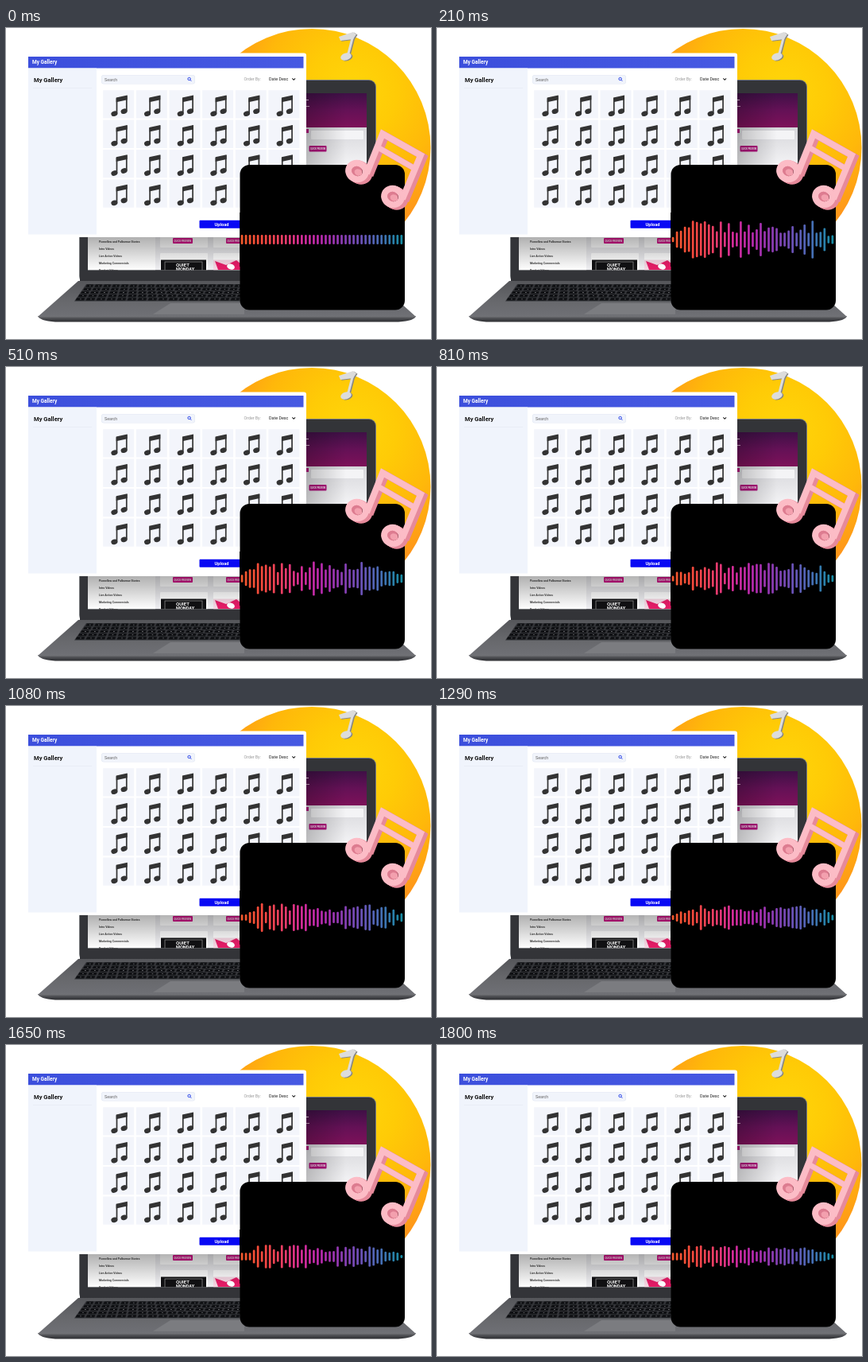
These frames come from a looping animation (535 by 391 pixels, 1830 ms). An HTML page with a canvas:

```html
<!DOCTYPE html>
<html lang="en">
<head>
<meta charset="utf-8">
<title>Music gallery</title>
<style>
html, body { margin: 0; width: 100%; height: 100%; overflow: hidden; background: #fff; }
canvas { display: block; width: 535px; height: 391px; }
</style>
</head>
<body>
<canvas id="stage" width="535" height="391"></canvas>
<script>
const ctx = document.getElementById('stage').getContext('2d');
const FONT = 'Roboto, Arial, sans-serif';

function rect(x, y, w, h, fill, r = 0) {
  ctx.fillStyle = fill;
  ctx.beginPath();
  ctx.roundRect(x, y, w, h, r);
  ctx.fill();
}

function poly(fill, ...pts) {
  ctx.fillStyle = fill;
  ctx.beginPath();
  pts.forEach(([x, y]) => ctx.lineTo(x, y));
  ctx.closePath();
  ctx.fill();
}

function oval(x, y, rx, ry, turn, fill) {
  ctx.fillStyle = fill;
  ctx.beginPath();
  ctx.ellipse(x, y, rx, ry, turn, 0, Math.PI * 2);
  ctx.fill();
}

function line(color, width, ...pts) {
  ctx.strokeStyle = color;
  ctx.lineWidth = width;
  ctx.beginPath();
  pts.forEach(([x, y]) => ctx.lineTo(x, y));
  ctx.stroke();
}

function text(str, x, y, size, color, weight = 400, align = 'left') {
  ctx.font = `${weight} ${size}px ${FONT}`;
  ctx.fillStyle = color;
  ctx.textAlign = align;
  ctx.fillText(str, x, y);
}

function addStops(g, colors) {
  colors.forEach((c, i) => g.addColorStop(i / (colors.length - 1), c));
  return g;
}

const blend = (x0, y0, x1, y1, ...colors) =>
  addStops(ctx.createLinearGradient(x0, y0, x1, y1), colors);

function drawSun() {
  const glow = addStops(ctx.createRadialGradient(435, 80, 0, 435, 80, 170),
    ['#ffd60a', '#ffcb06', '#ffb80a', '#ff961a']);
  oval(385, 150.5, 149.5, 149.5, 0, glow);
}

function drawGreyNote() {
  for (const [shift, tone] of [[1.5, '#868686'], [0, '#dcdcdc']]) {
    ctx.save();
    ctx.translate(shift, shift / 2);
    line(tone, 3, [437, 9], [430, 36]);
    poly(tone, [419, 11], [437, 5], [441, 8], [437, 14], [421, 16]);
    oval(428, 36, 7, 4.5, -0.3, tone);
    ctx.restore();
  }
}

function drawScreen() {
  rect(92, 65, 374, 256, '#77797d', 9);
  rect(93, 66, 372, 254, '#333438', 8);
  rect(103, 82, 351, 222.5, '#ececef');

  // page behind the gallery's right edge
  rect(103, 82, 351, 43, blend(0, 82, 0, 125, '#3f1046', '#641156', '#7d1159'));
  rect(378, 90, 3, 1, '#d9bdd3');
  rect(378, 98, 4, 1, '#c9a2be');
  rect(378, 125, 76, 48, blend(0, 125, 0, 173, '#d6d6da', '#f4f4f6'));
  rect(384, 129, 66, 11, '#f4f4f6', 1);
  rect(378, 127, 3, 5, '#b0127c');
  rect(381.5, 148, 22, 7.5, '#b0127c', 1);
  text('QUICK PREVIEW', 392.5, 153, 2.6, '#fff', 700, 'center');
  rect(378, 82, 50, 91, blend(378, 0, 428, 0, 'rgba(0,0,0,.22)', 'rgba(0,0,0,0)'));

  // page below the gallery
  rect(103, 262, 85, 42.5, '#fafafa');
  ['Pixmellow and Palbarrow Stories', 'Intro Videos', 'Live Action Videos',
    'Marketing Commercials', 'Product Videos'].forEach((s, i) =>
    text(s, 117, 270 + i * 9, 3.5, '#222', 500));
  for (const [x, w, button] of [[194, 60, 25], [261, 34, 18]]) {
    rect(x, 262, w, 14, '#fff', 1);
    rect(x, 283, w, 21.5, '#fff', 1);
    rect(x + 16, 264, button, 7, '#d4148a', 1);
    text('QUICK PREVIEW', x + 17.5, 268.7, 2.9, '#fff', 700);
  }
  rect(195, 291.5, 57, 13, '#101012');
  ctx.strokeStyle = '#8c8c8c';
  ctx.lineWidth = 0.8;
  ctx.strokeRect(200, 294, 47, 14);
  text('QUIET', 214, 300, 6, '#fff', 700);
  text('MONDAY', 214, 305, 5.6, '#fff', 700);
  rect(261, 291.5, 34, 13, '#f3d5e1');
  poly('#e31c66', [263, 293], [277, 298], [290, 292], [295, 296], [295, 304], [267, 304]);
  oval(283, 300, 5, 3.5, 0.3, '#fff');
  rect(103, 262, 192, 42.5, blend(0, 262, 0, 302, 'rgba(0,0,0,.3)', 'rgba(0,0,0,0)'));
  rect(93, 304.5, 372, 14, '#333438');
}

function drawBase() {
  poly(blend(0, 318, 0, 364, '#55565a', '#66676b', '#707176'),
    [91, 318], [466, 318], [516, 363], [40, 363]);
  poly('#333438', [101, 322], [300, 322], [300, 343.5], [86, 343.5]);
  for (let row = 0; row < 5; row++) {
    const y = 322.5 + row * 4.2, step = 11 + row * 0.5;
    for (let x = 101 - row * 3.2; x < 294; x += step) {
      poly('#0f1013', [x + 1, y], [x + step - 2, y], [x + step - 3, y + 3.2], [x - 0.6, y + 3.2]);
      rect(x + step / 2 - 1.5, y + 1.2, 1.6, 0.8, '#77787c');
    }
  }
  poly('#7b7c80', [207, 346], [300, 346], [300, 360], [185, 360]);
  ctx.fillStyle = blend(0, 361, 0, 369.5, '#85868a', '#4c4d51', '#2d2e32');
  ctx.beginPath();
  ctx.moveTo(40, 362);
  ctx.lineTo(516, 362);
  ctx.quadraticCurveTo(515, 368, 494, 369.5);
  ctx.lineTo(62, 369.5);
  ctx.quadraticCurveTo(42, 368, 40, 362);
  ctx.fill();
}

function drawTile(x, y) {
  rect(x, y, 39, 35.3, '#f3f5fb');
  const ink = '#333';
  poly(ink, [x + 16.5, y + 9.3], [x + 30.5, y + 6.3], [x + 30.5, y + 12], [x + 16.5, y + 15]);
  line(ink, 1.7, [x + 17.3, y + 10], [x + 17.3, y + 29.3]);
  line(ink, 1.7, [x + 29.6, y + 7], [x + 29.6, y + 26.3]);
  oval(x + 14.2, y + 29.5, 4.1, 3.2, -0.3, ink);
  oval(x + 26.4, y + 26.5, 4.1, 3.2, -0.3, ink);
}

function drawGallery() {
  rect(28, 31.5, 350, 231.5, '#fff', 3);
  rect(28, 36, 346.5, 14.5, blend(28, 0, 374, 0, '#3c4fdc', '#4659e2'));
  text('My Gallery', 33, 45.4, 6.5, '#fff', 700);
  rect(28, 50.5, 86, 209, '#f0f4fc');
  text('My Gallery', 35, 68.2, 7.6, '#111', 700);
  rect(34, 75.5, 74, 0.6, '#e4e8f1');

  rect(120, 59, 118, 11.5, '#e3e8f3', 3);
  rect(120.6, 59.6, 116.8, 10.3, '#f1f4fb', 3);
  text('Search', 124, 66.5, 5.3, '#666');
  ctx.strokeStyle = '#2c46e8';
  ctx.lineWidth = 1;
  ctx.beginPath();
  ctx.arc(230.6, 64, 1.7, 0, Math.PI * 2);
  ctx.stroke();
  line('#2c46e8', 1, [231.8, 65.2], [233.3, 66.8]);
  text('Order By:', 299.5, 66.3, 5.3, '#999');
  text('Date Desc', 331, 66.3, 5.4, '#222');
  line('#222', 1.1, [360.3, 63.4], [362.2, 65.3], [364.1, 63.4]);

  for (let row = 0; row < 4; row++)
    for (let col = 0; col < 6; col++) drawTile(122.2 + col * 41.65, 78.2 + row * 37.4);

  rect(243.5, 241.8, 56, 10, '#0808f4', 1);
  text('Upload', 271.5, 248.8, 5.7, '#fff', 700, 'center');
}

// A beamed pair built in layers, so the offset copies form its thickness.
function drawPinkNote() {
  const layers = 5;
  for (let i = layers; i >= 0; i--) {
    const tone = i ? '#e68a9b' : '#fcbcc6';
    ctx.save();
    ctx.translate(i * 0.9, i * 0.5);
    line(tone, 8, [454, 183], [474, 133], [522, 160], [499, 215]);
    line(tone, 7, [468, 150], [515, 177]);
    for (const [x, y] of [[442, 180], [487, 212]]) {
      ctx.strokeStyle = tone;
      ctx.lineWidth = 8;
      ctx.beginPath();
      ctx.ellipse(x, y, 11, 10, 0.4, 0, Math.PI * 2);
      ctx.stroke();
      if (!i) oval(x, y, 7, 6, 0.4, '#dd7c90');
      if (!i) oval(x + 1.5, y + 1.5, 5, 4, 0.4, '#f3a0ae');
    }
    ctx.restore();
  }
}

const LOOP = 1830, STEP = 30, BEAT = 300, RISE = 210;
const BARS = 41, MID = 266, REST = 6;

const mix = (a, b, u) => a + (b - a) * u;
const smooth = u => (1 - Math.cos(Math.PI * u)) / 2;
const backOut = u => 1 + 2.4 * (u - 1) ** 3 + 1.4 * (u - 1) ** 2;

function seeded(a, b) {
  const s = Math.sin(a * 127.1 + b * 311.7) * 43758.5453;
  return s - Math.floor(s);
}

// Height of one bar on a beat: random peaks, shorter at both ends.
function peak(bar, beat) {
  const edge = Math.min(bar, BARS - 1 - bar);
  const taper = Math.min(1, 0.35 + edge * 0.16);
  return taper * (7 + 13 * seeded(bar + 1, beat + 1) ** 1.3);
}

function barHeight(bar, t) {
  if (t < RISE) return mix(REST, peak(bar, 0) * 1.2, backOut(t / RISE));
  const pos = (t - RISE) / BEAT, beat = Math.floor(pos);
  const level = mix(1.2, 0.75, (t - RISE) / (LOOP - RISE));
  return level * mix(peak(bar, beat), peak(bar, beat + 1), smooth(pos - beat));
}

const barPaint = blend(296, 0, 499, 0,
  '#f45a2c', '#f74a3c', '#ee3f63', '#d22b97', '#b529ad', '#8c3cb4', '#6a53b8', '#4471b5', '#168da3');

function drawBars(t) {
  rect(294.5, 232, 207.5, 68, '#000');
  for (let i = 0; i < BARS; i++) {
    const half = barHeight(i, t);
    rect(295.7 + i * 5.02, MID - half, 2.7, half * 2, barPaint, 1.3);
  }
}

drawSun();
drawGreyNote();
drawScreen();
drawBase();
drawGallery();
rect(294.5, 172, 207.5, 182.5, '#000', 12);
drawPinkNote();

const start = performance.now();
function frame() {
  const t = (performance.now() - start) % LOOP;
  drawBars(Math.floor(t / STEP) * STEP);
  requestAnimationFrame(frame);
}
frame();
</script>
</body>
</html>
```
